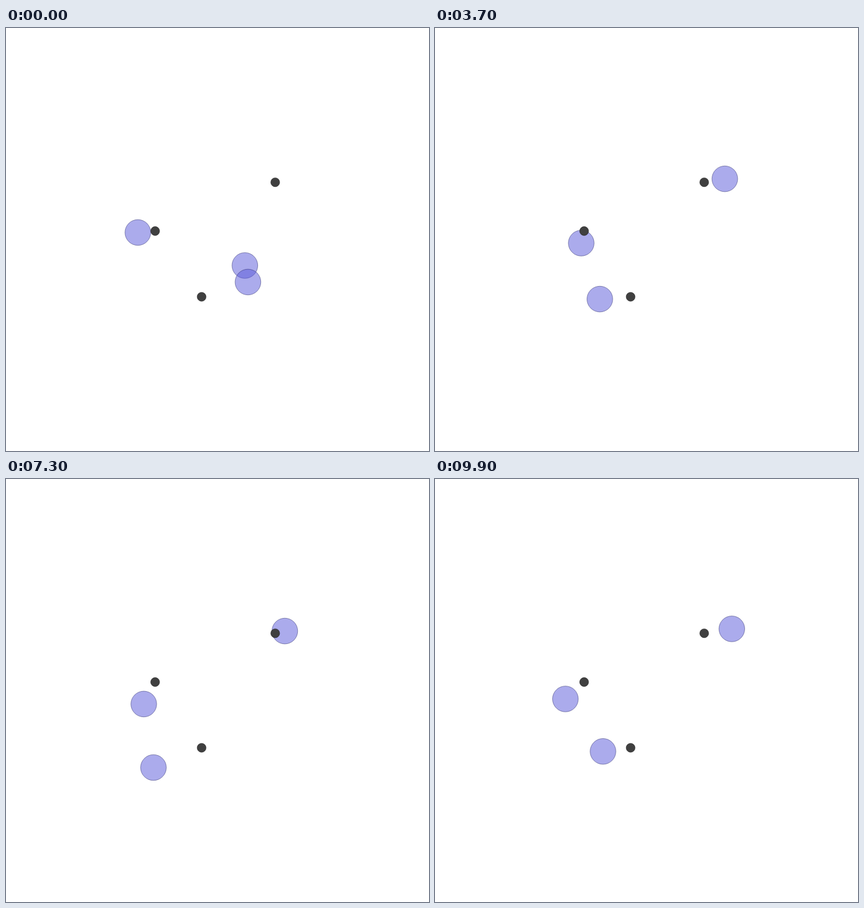
These frames come from a looping animation (700 px wide and 700 px high, 10 s). An HTML page with a canvas:

```html
<!DOCTYPE html>
<html>
<head>
<meta charset="utf-8">
<style>
  html, body { margin: 0; height: 100%; overflow: hidden; background: #fff; }
  canvas { display: block; }
</style>
</head>
<body>
<canvas id="stage" width="700" height="700"></canvas>
<script>
const ctx = document.getElementById('stage').getContext('2d');
const STEP = 100, STEPS = 100;

const landmarks = [[445.5, 255.3], [246.8, 336], [323.7, 444.8]];

// Steps at which the agents pass their key points
const times = [0, 15, 37, 51, 73, 89, 99];

// Each agent bows out by its sway between two key points
const agents = [
  { sway: [-13, 0],
    points: [[218.2, 338.4], [244.6, 373], [242, 356], [242.8, 363.5],
             [228, 372.4], [225, 388], [215.8, 364]] },
  { sway: [5, -14],
    points: [[395.3, 393], [413, 257], [479.6, 249.6], [452, 253.5],
             [461.4, 251.6], [456.8, 252.2], [491.2, 248]] },
  { sway: [-3, 6],
    points: [[400.4, 420.4], [363.4, 439], [272.8, 448.6], [268, 421.3],
             [244, 477.5], [269.7, 440.4], [278, 450.8]] }
];

const easeOut = u => u * (2 - u);
const easeInOut = u => u * u * (3 - 2 * u);

function locate({ points, sway }, step) {
  const next = Math.max(1, times.findIndex(t => t >= step));
  const from = times[next - 1];
  const u = (step - from) / (times[next] - from);
  const ease = next === 1 ? easeOut(u) : easeInOut(u);
  const bow = Math.sin(Math.PI * u);
  const [a, b] = [points[next - 1], points[next]];
  return a.map((p, axis) => p + (b[axis] - p) * ease + sway[axis] * bow);
}

function disc([x, y], radius, fill, line) {
  ctx.beginPath();
  ctx.arc(x, y, radius, 0, 2 * Math.PI);
  ctx.fillStyle = fill;
  ctx.fill();
  ctx.strokeStyle = line;
  ctx.stroke();
}

function draw(now) {
  const step = Math.floor(now / STEP) % STEPS;
  ctx.clearRect(0, 0, 700, 700);
  for (const agent of agents) {
    disc(locate(agent, step), 21.3, 'rgba(89,89,217,.5)', 'rgba(45,45,108,.5)');
  }
  for (const spot of landmarks) disc(spot, 7.4, '#404040', 'rgba(32,32,32,.6)');
}

const start = performance.now();
function tick() {
  draw(performance.now() - start);
  requestAnimationFrame(tick);
}
tick();
</script>
</body>
</html>
```
